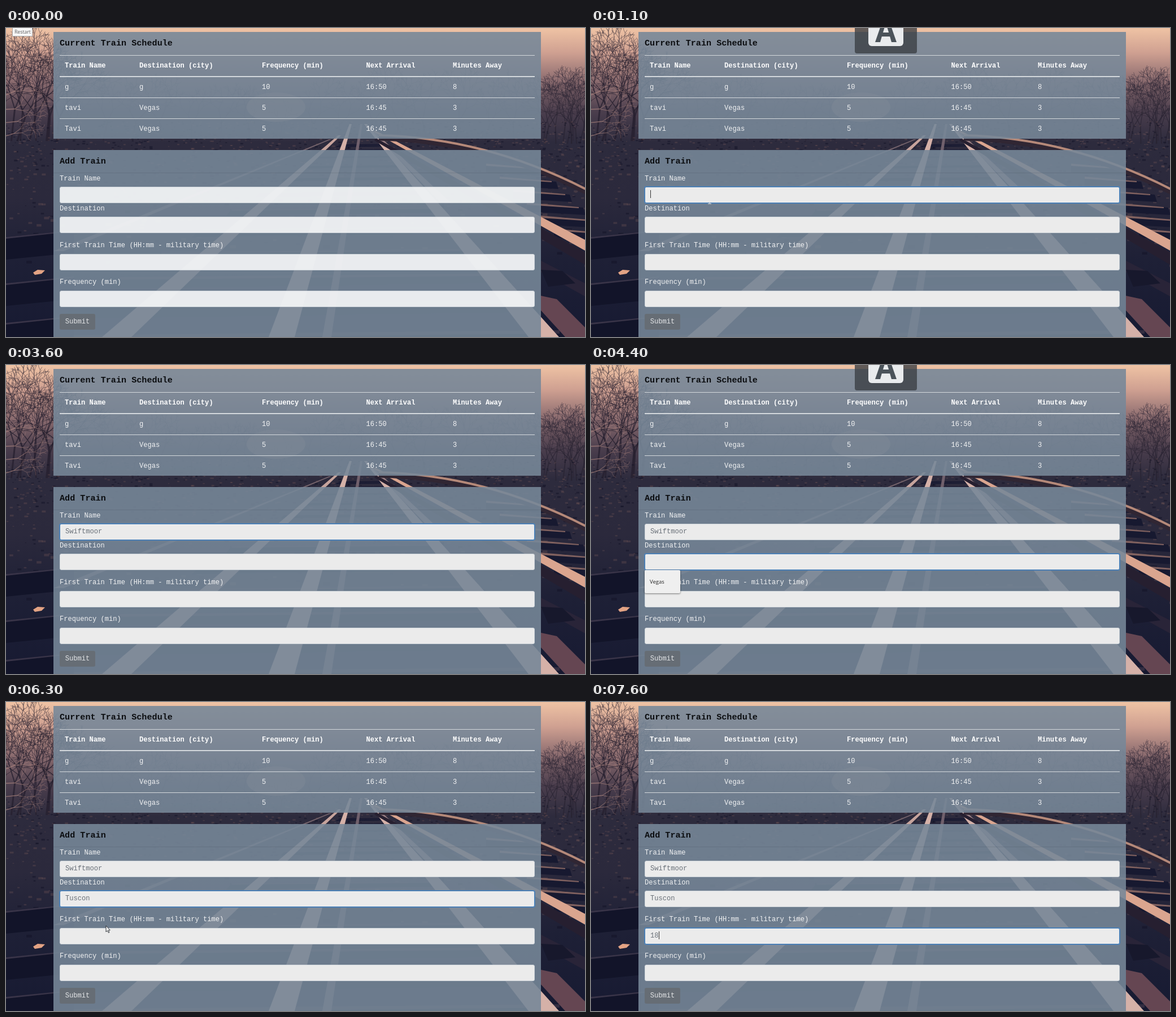
An HTML page with a canvas that plays this animation: 1025 by 547 pixels, repeating every 8000 ms.

```html
<!DOCTYPE html>
<html lang="en">
<head>
<meta charset="utf-8">
<title>Train schedule</title>
<style>
html, body { margin: 0; width: 100%; height: 100%; overflow: hidden; background: #1b1d33; }
#stage { position: relative; width: 1025px; height: 547px; overflow: hidden; font: 12.1px/20px "Liberation Mono", monospace; color: #f1f2f3; }
#stage > * { position: absolute; box-sizing: border-box; white-space: pre; }
canvas { left: 0; top: 0; }
.panel { left: 84px; width: 863px; background: rgba(119,136,153,.885); }
.title { font-size: 15.15px; font-weight: bold; color: #0b0d10; }
.head { font-weight: bold; color: #fff; }
.rule { left: 95px; width: 841px; background: #d3d8dc; }
.field { left: 95px; width: 841px; height: 29px; padding-left: 9px; line-height: 27px; color: #697078; background: #ebebeb; border: 1px solid #ced4da; border-radius: 3px; }
.sheer .field { background: rgba(255,255,255,.85); }
.field.on { border-color: #4a7fb5; box-shadow: 0 0 0 1px #4c80b6; }
.field.caret::after { content: ""; display: inline-block; width: 1px; height: 14px; background: #333; vertical-align: -3px; }
.button { left: 95px; top: 506px; width: 63px; height: 28px; line-height: 28px; text-align: center; background: #666d75; color: #e4e6e8; border-radius: 3px; }
.list { left: 95px; width: 63px; height: 41px; padding-left: 9px; background: #efefef; color: #262626; font: 9.5px/41px "Open Sans", sans-serif; border-radius: 2px; box-shadow: 0 1px 3px rgba(0,0,0,.5); }
.caps { left: 467px; top: -65px; width: 110px; height: 110px; background: rgba(58,62,67,.78); border-radius: 4px; }
.caps b { position: absolute; left: 24px; top: 33px; width: 62px; height: 64px; overflow: hidden; border-radius: 6px; background: #e9ebed; color: #4b535a; text-align: center; font: bold 55px/72px "Open Sans", sans-serif; }
.tip { left: 11px; top: -5px; width: 36px; height: 20px; padding-left: 3px; font: 8.7px/22px "Open Sans", sans-serif; background: #f8f8f8; color: #5c5c5c; border: 1px solid #aaa; }
svg { left: 0; top: 0; overflow: visible; }
</style>
</head>
<body>
<div id="stage"><canvas width="1025" height="547"></canvas></div>
<script>
const LOOP = 8000, TICK = 100, BLINK = 530;
const stage = document.getElementById('stage');

function add(cls, text = '', style = {}) {
  const el = document.createElement('div');
  el.className = cls;
  el.textContent = text;
  for (const key in style) el.style[key] = style[key] + 'px';
  stage.append(el);
  return el;
}
const label = (x, middle, text, cls = '') => add(cls, text, { left: x, top: middle - 9.5 });

// Backdrop: dusk sky, bare trees and converging rails
function paintBackdrop() {
  const g = stage.querySelector('canvas').getContext('2d');
  let seed = 11;
  const rnd = (a = 0, b = 1) => {
    seed = (seed * 16807) % 2147483647;
    return a + (b - a) * seed / 2147483647;
  };
  const sky = g.createLinearGradient(0, 0, 0, 547);
  [[0, '#efc3a4'], [.08, '#cfa091'], [.17, '#8d6d70'], [.27, '#4b3e4d'], [.37, '#2d2b3d'],
   [.55, '#2b293c'], [.75, '#1e2036'], [1, '#171a32']].forEach(s => sky.addColorStop(...s));
  g.fillStyle = sky;
  g.fillRect(0, 0, 1025, 547);

  function poly(color, ...p) {
    g.fillStyle = color;
    g.beginPath();
    for (let i = 0; i < p.length; i += 2) g.lineTo(p[i], p[i + 1]);
    g.fill();
  }
  function branch(x, y, angle, length, width, color) {
    if (length < 5) return;
    const x2 = x + Math.cos(angle) * length, y2 = y + Math.sin(angle) * length;
    g.strokeStyle = color;
    g.lineWidth = width;
    g.beginPath();
    g.moveTo(x, y);
    g.lineTo(x2, y2);
    g.stroke();
    for (const turn of [rnd(-.7, -.15), rnd(.15, .7)])
      branch(x2, y2, angle + turn, length * rnd(.62, .85), Math.max(.6, width * .65), color);
  }
  for (let i = 0; i < 9; i++)
    branch(rnd(-10, 110), 200, rnd(-1.9, -1.2), rnd(35, 58), rnd(2, 4), 'rgba(39,33,48,.8)');
  for (let i = 0; i < 18; i++)
    branch(120 + i * 52, 200, rnd(-1.8, -1.3), rnd(24, 36), 2, 'rgba(45,39,54,.6)');
  for (let i = 0; i < 9; i++)
    branch(rnd(935, 1035), 205, rnd(-1.8, -1.3), rnd(25, 38), 2, 'rgba(40,35,49,.65)');
  for (let i = 0; i < 4; i++)
    branch(-4, 120 + i * 24, rnd(-.5, .1), rnd(16, 26), 1.6, 'rgba(190,146,134,.55)');

  g.fillStyle = 'rgba(185,145,130,.5)';
  g.beginPath();
  g.ellipse(478, 140, 52, 26, 0, 0, 7);
  g.fill();

  for (let i = 0; i < 1800; i++) {
    const y = 165 + 260 * rnd() * rnd(), size = rnd(1, 2 + (y - 165) / 60);
    g.fillStyle = rnd() < .5 ? 'rgba(18,19,38,.5)' : 'rgba(126,94,92,.28)';
    g.fillRect(rnd(0, 1025), y, size * 2, size);
  }

  // Sleepers grow towards the viewer
  for (let i = 0; i < 13; i++) {
    const d = (i / 12) ** 2, y = 205 + d * 330, h = 2 + d * 22;
    const left = 590 - d * 560, right = 660 + d * 320;
    poly('#151830', left, y + h * .4, right, y, right + h, y + h, left - h, y + h * 1.6);
    poly('rgba(120,95,102,.3)', left, y + h * .4, right, y, right, y + h * .25, left, y + h * .65);
  }
  for (let i = 0; i < 6; i++) {
    const x = 850 + i * 24, y = 240 + i * 23;
    poly('#171930', x, y, x + 100, y + 9, x + 104, y + 22, x, y + 16);
    poly('#80615f', x, y, x + 92, y + 8, x + 92, y + 10, x, y + 4);
  }
  for (const y of [370, 452, 522]) {
    poly('#121429', 0, y, 120, y - 12, 120, y + 28, 0, y + 40);
    poly('#393448', 0, y, 120, y - 12, 120, y - 10, 0, y + 3);
  }
  poly('#e3a384', 48, 433, 56, 428, 69, 429, 63, 435, 51, 437);

  const rail = (x1, y1, w1, x2, y2, w2, color) =>
    poly(color, x1, y1, x1 + w1, y1, x2 + w2, y2, x2, y2);
  rail(588, 190, 5, 170, 547, 52, '#c7a49d');
  rail(608, 170, 4, 465, 547, 46, '#d5b1a8');
  rail(627, 170, 4, 560, 547, 16, '#70606c');
  rail(634, 170, 5, 925, 547, 54, '#d5b1a8');
  rail(572, 197, 4, 84, 395, 18, '#76656d');
  rail(650, 185, 4, 770, 310, 18, '#9b8085');
  poly('#261f30', 655, 195, 1025, 397, 1025, 419, 652, 199);
  poly('#daa58f', 653, 181, 1025, 375, 1025, 394, 651, 184);
  g.lineWidth = 9;
  g.strokeStyle = '#302633';
  const curve = dy => {
    g.beginPath();
    g.moveTo(660, 190 + dy);
    g.quadraticCurveTo(850, 194 + dy, 1030, 287 + dy);
    g.stroke();
  };
  curve(5);
  g.lineWidth = 4;
  g.strokeStyle = '#b58979';
  curve(0);

  poly('#292438', 947, 412, 1025, 452, 1025, 475, 947, 432);
  poly('#17182c', 947, 428, 985, 430, 1008, 452, 960, 458);
  poly('#654652', 947, 474, 975, 480, 1025, 530, 1025, 547, 990, 547, 947, 500);
}
paintBackdrop();

add('panel', '', { top: 7, height: 189 });
add('panel', '', { top: 216, height: 331 });
label(95, 26.5, 'Current Train Schedule', 'title');
label(95, 235.5, 'Add Train', 'title');
add('', '', { left: 84, top: 256, width: 863, height: 1 }).style.background = 'rgba(40,50,60,.14)';

[[48, 1], [85, 1.5], [122.5, 1], [159.5, 1]].forEach(([top, height]) => add('rule', '', { top, height }));
const columns = [104, 236, 453, 637.5, 791];
[['Train Name', 'Destination (city)', 'Frequency (min)', 'Next Arrival', 'Minutes Away'],
 ['g', 'g', '10', '16:50', '8'],
 ['tavi', 'Vegas', '5', '16:45', '3'],
 ['Tavi', 'Vegas', '5', '16:45', '3']
].forEach((row, r) => row.forEach((text, c) =>
  label(columns[c], [66, 104, 141, 178][r], text, r ? '' : 'head')));

['Train Name', 'Destination', 'First Train Time (HH:mm - military time)', 'Frequency (min)']
  .forEach((text, i) => label(95, [266, 319, 384, 449][i], text));
const fieldTops = [281, 334, 400, 465];
const fields = fieldTops.map(top => add('field', '', { top }));
add('button', 'Submit');

const lists = [
  { el: add('list', 'Vegas', { top: 363 }), from: 3900, to: 4600 },
  { el: add('list', '12:00', { top: 428 }), from: 6900, to: 7300 }
];
const caps = add('caps');
const key = caps.appendChild(document.createElement('b'));
const tip = add('tip', 'Restart');
stage.insertAdjacentHTML('beforeend', `<svg width="1" height="1" fill="none">
  <path id="arrow" d="M0 0V11L2.5 8.7 4.4 12.5 6 11.8 4.2 8H7.3Z" fill="#f5f5f5" stroke="#20242b" stroke-width=".9"/>
  <path id="beam" d="M-3 -8H3M0 -8V8M-3 8H3" stroke="#ebebeb"/></svg>`);
const arrow = document.getElementById('arrow'), beam = document.getElementById('beam');

const entries = [
  { focus: 800, text: 'Swiftmoor', keys: [1200, 1500, 1600, 1700, 2100, 2300, 2500, 2600, 2700] },
  { focus: 3800, text: 'Tuscon', keys: [4600, 4800, 5000, 5200, 5400, 5600] },
  { focus: 6800, text: '18', keys: [7300, 7600] }
];
const capsSteps = [[0, ''], [1100, 'A'], [1300, 'a'], [2800, ''], [4300, 'A'], [4600, 'a'], [5800, '']];
const path = [[100, 14, -20], [800, 210, 303], [3200, 210, 303], [3600, 209, 345],
              [6000, 205, 345], [6300, 177, 396], [6600, 172, 414], [LOOP, 172, 414]];

function pointerAt(t) {
  const i = path.findIndex(p => p[0] > t);
  if (i < 1) return path[0].slice(1);
  const [a, b] = [path[i - 1], path[i]];
  const k = (t - a[0]) / (b[0] - a[0]);
  return [1, 2].map(n => a[n] + (b[n] - a[n]) * k);
}
const show = (el, on) => { el.style.display = on ? '' : 'none'; };

function render(now) {
  const t = Math.floor(now % LOOP / TICK) * TICK;
  stage.classList.toggle('sheer', t < 300);
  show(tip, t < 200);

  const active = entries.filter(e => t >= e.focus).length - 1;
  entries.forEach((e, i) => {
    const count = e.keys.filter(k => t >= k).length;
    const last = count ? e.keys[count - 1] : e.focus;
    const lit = Math.floor((t - last) / BLINK) % 2 === 0;
    fields[i].textContent = e.text.slice(0, count);
    fields[i].classList.toggle('on', i === active);
    fields[i].classList.toggle('caret', i === active && lit);
  });
  lists.forEach(l => show(l.el, t >= l.from && t < l.to));

  const letter = capsSteps.filter(s => t >= s[0]).pop()[1];
  show(caps, letter);
  key.textContent = letter;

  const [x, y] = pointerAt(t);
  const overField = x > 95 && fieldTops.some(top => y >= top && y < top + 29);
  show(arrow, !overField);
  show(beam, overField);
  (overField ? beam : arrow).setAttribute('transform', `translate(${x} ${y})`);
}

const start = performance.now();
(function frame() {
  render(performance.now() - start);
  requestAnimationFrame(frame);
})();
</script>
</body>
</html>
```
